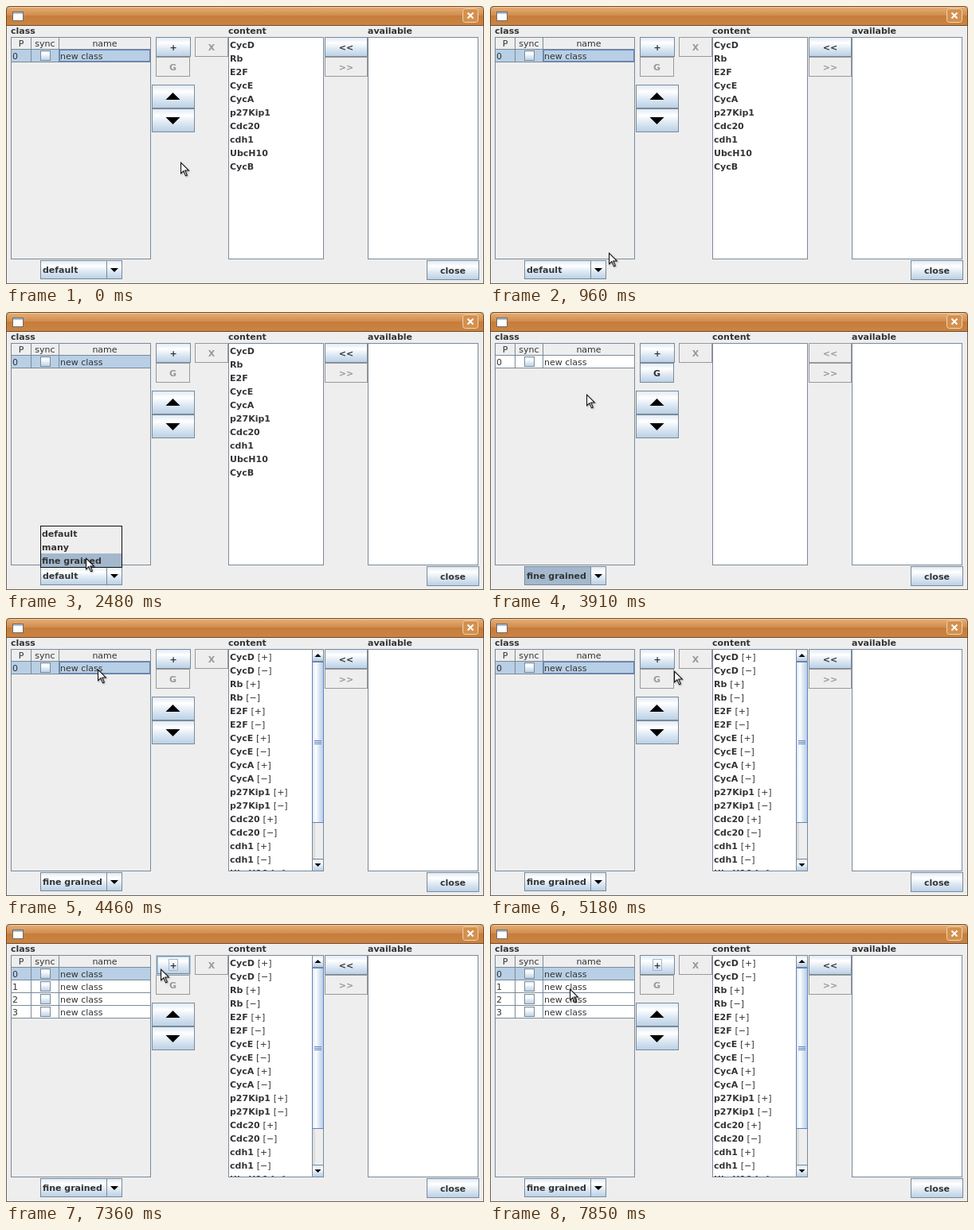
Recreate the animation shown at these times as an HTML page with a canvas. Size 600x350 px, loop 8 s.

```html
<!DOCTYPE html>
<html>
<head>
<meta charset="utf-8">
<style>
html, body { margin: 0; width: 100%; height: 100%; overflow: hidden; background: #eee; }
canvas { display: block; }
</style>
</head>
<body>
<canvas id="stage" width="600" height="350"></canvas>
<script>
const c = document.getElementById('stage').getContext('2d');
const LOOP = 8000;
const EDGE = '#7a8a99', SELECT = '#b8cfe5', FOCUS = '#a3b8cc', BLUE = '#6382bf', INK = '#333', OFF = '#999';
const SPECIES = ['CycD', 'Rb', 'E2F', 'CycE', 'CycA', 'p27Kip1', 'Cdc20', 'cdh1', 'UbcH10', 'CycB'];
const MODES = ['default', 'many', 'fine grained'];

// Pointer moves: start time, time per step, then [step, x, y] waypoints
const MOVES = [
  [0, 1, [[0, 219, 196]]],
  [640, 40, [[0, 219, 196], [2, 224, 206], [5, 190, 262], [9, 149, 310], [12, 141, 325], [16, 138, 330]]],
  [1980, 45.4, [[0, 138, 330], [2, 141, 326], [5, 124, 316], [12, 100, 309]]],
  [3670, 47.5, [[0, 100, 309], [1, 95, 311], [2, 100, 265], [4, 126, 145], [6, 121, 103], [9, 117, 73], [13, 115, 64]]],
  [4730, 47.6, [[0, 115, 64], [3, 165, 70], [7, 230, 74], [8, 237, 72], [10, 231, 66], [14, 213, 58]]],
  [5610, 1, [[0, 209, 53]]],
  [7360, 49, [[0, 209, 53], [3, 165, 62], [7, 115, 77], [11, 100, 81]]]
];

function pointer(t) {
  const [start, dt, pts] = MOVES.filter(m => m[0] <= t).pop();
  const step = Math.floor((t - start) / dt) + 1;
  const n = pts.findIndex(p => p[0] >= step);
  if (n < 1) return pts[pts.length - 1].slice(1);
  const [a, ax, ay] = pts[n - 1], [b, bx, by] = pts[n];
  const k = (step - a) / (b - a);
  return [Math.round(ax + (bx - ax) * k), Math.round(ay + (by - ay) * k)];
}

function fill(x, y, w, h, color) {
  c.fillStyle = color;
  c.fillRect(x, y, w, h);
}

function frame(x, y, w, h, color) {
  c.strokeStyle = color;
  c.lineWidth = 1;
  c.strokeRect(x + .5, y + .5, w - 1, h - 1);
}

function text(s, x, y, { color = INK, bold = true, align = 'left' } = {}) {
  c.font = (bold ? 'bold ' : '') + '11px "DejaVu Sans", sans-serif';
  c.textAlign = align;
  c.fillStyle = color;
  c.fillText(s, x, y);
}

function shape(points, color) {
  c.beginPath();
  points.forEach(p => c.lineTo(...p));
  c.closePath();
  c.fillStyle = color;
  c.fill();
}

// Triangle with its top edge (or apex) at y
function arrow(x, y, half, h, up) {
  const base = up ? y + h : y;
  shape([[x - half, base], [x + half, base], [x, up ? y : y + h]], '#000');
}

function gloss(x, y, w, h, sideways) {
  const g = sideways ? c.createLinearGradient(x, 0, x + w, 0) : c.createLinearGradient(0, y, 0, y + h);
  g.addColorStop(0, '#dde8f3');
  g.addColorStop(.3, '#fff');
  g.addColorStop(.6, '#dde8f3');
  g.addColorStop(1, SELECT);
  fill(x, y, w, h, g);
}

function button(x, y, w, h, label, { on = true, hover = false, focus = false } = {}) {
  if (on) gloss(x, y, w, h);
  frame(x, y, w, h, on ? EDGE : OFF);
  if (hover) {
    frame(x, y, w, h, SELECT);
    frame(x + 1, y + 1, w - 2, h - 2, EDGE);
    frame(x + 2, y + 2, w - 4, h - 4, SELECT);
  }
  const mid = x + w / 2;
  if (focus) frame(Math.round(mid) - 6, y + 5, 12, 15, FOCUS);
  text(label, mid, y + Math.round(h / 2) + 4, { color: on ? INK : OFF, align: 'center' });
}

function panel(x, w, color) {
  fill(x, 39, w, 280, color);
  frame(x, 39, w, 280, EDGE);
}

function titleBar() {
  fill(0, 0, 600, 25, '#ddd');
  const g = c.createLinearGradient(0, 0, 0, 24);
  [[0, '#e9b987'], [.15, '#e0a76d'], [.48, '#d18d4e'], [.52, '#c67d3c'], [1, '#cb8443']].forEach(s => g.addColorStop(...s));
  c.beginPath();
  c.roundRect(0, 0, 600, 25, [5, 5, 0, 0]);
  c.fillStyle = '#704a28';
  c.fill();
  c.beginPath();
  c.roundRect(1, 1, 598, 23, [4, 4, 0, 0]);
  c.fillStyle = g;
  c.fill();
  fill(5, 1, 590, 1, '#f0c89c');

  fill(8, 7, 14, 12, '#fff');
  frame(8, 7, 14, 12, '#6d6d6d');
  fill(9, 8, 12, 2, '#aebfd4');

  c.beginPath();
  c.roundRect(573.5, 3.5, 19, 17, 3);
  c.fillStyle = '#d3914f';
  c.fill();
  c.strokeStyle = '#f3d3ae';
  c.lineWidth = 1;
  c.stroke();
  c.beginPath();
  c.moveTo(579.5, 8.5); c.lineTo(586.5, 15.5);
  c.moveTo(586.5, 8.5); c.lineTo(579.5, 15.5);
  c.strokeStyle = '#fff';
  c.lineWidth = 2;
  c.stroke();
}

function classTable(rows, selected, cellFocus) {
  panel(6, 176, '#eee');
  const plain = { bold: false };
  [['P', 19], ['sync', 49], ['name', 124]].forEach(([s, x]) => text(s, x, 51, { bold: false, align: 'center' }));
  fill(7, 54, 174, 1, EDGE);
  for (let i = 0; i < rows; i++) {
    const y = 55 + i * 16;
    fill(7, y, 174, 15, i === 0 && selected ? SELECT : '#fff');
    fill(7, y + 15, 174, 1, EDGE);
    text(i, 8, y + 12, plain);
    text('new class', 68, y + 12, plain);
    gloss(43, y + 1, 13, 13);
    frame(43, y + 1, 13, 13, EDGE);
  }
  [31, 66].forEach(x => fill(x, 40, 1, 15 + rows * 16, EDGE));
  if (cellFocus) frame(67, 55, 114, 15, BLUE);
}

function contentList(fine) {
  c.save();
  c.beginPath();
  c.rect(280, 40, 118, 278);
  c.clip();
  SPECIES.forEach((name, i) => {
    if (!fine) return text(name, 281, 53 + i * 17);
    ['[+]', '[\u2212]'].forEach((sign, j) => {
      const y = 53 + (2 * i + j) * 17;
      text(name, 281, y);
      const w = c.measureText(name + ' ').width;
      text(sign, 281 + w, y, { bold: false });
    });
  });
  c.restore();
  if (fine) scrollBar();
}

function scrollBar() {
  fill(384, 40, 14, 278, '#eee');
  fill(385, 257, 3, 47, '#ddd');
  frame(384, 39, 15, 280, EDGE);
  [40, 304].forEach(y => {
    gloss(385, y, 13, 14);
    frame(384, y - 1, 15, 16, EDGE);
    arrow(391.5, y + 5, 4, 4, y === 40);
  });
  gloss(385, 55, 13, 202, true);
  frame(384, 55, 15, 203, BLUE);
  [154, 156, 158].forEach(y => fill(387, y, 9, 1, BLUE));
}

function combo(label, focus) {
  gloss(43, 320, 103, 24);
  if (focus) fill(44, 321, 82, 22, FOCUS);
  frame(43, 320, 103, 24, EDGE);
  fill(126, 320, 1, 24, EDGE);
  arrow(136, 330, 5, 5, false);
  text(label, 46, 336);
}

function popup(active) {
  fill(43, 269, 103, 53, '#eee');
  fill(44, 270 + active * 17, 101, 17, FOCUS);
  MODES.forEach((s, i) => text(s, 45, 283 + i * 17));
  frame(43, 269, 103, 53, '#111');
}

function cursor(x, y) {
  const outline = [[0, 0], [0, 16], [3.7, 12.6], [6.2, 18.5], [9, 17.3], [6.5, 11.6], [11.6, 11.4]];
  const inner = [[1.1, 2.6], [1.1, 13.5], [4.1, 10.8], [6.7, 17.1], [7.6, 16.7], [5, 10.6], [9.1, 10.4]];
  c.save();
  c.translate(x, y);
  c.shadowColor = 'rgba(0,0,0,.3)';
  c.shadowBlur = 2;
  c.shadowOffsetX = c.shadowOffsetY = 1;
  shape(outline, '#111');
  c.shadowColor = 'transparent';
  shape(inner, '#fff');
  c.restore();
}

function draw(t) {
  const [px, py] = pointer(t);
  const fine = t >= 3220;
  const idle = fine && t < 4460;
  const rows = 1 + [6080, 6680, 7360].filter(at => t >= at).length;
  const hover = px >= 188 && px < 232 && py >= 39 && py < 64;

  fill(0, 0, 600, 350, '#eee');
  titleBar();
  [0, 599].forEach(x => fill(x, 25, 1, 325, '#6e6257'));
  fill(0, 349, 600, 1, '#6e6257');

  [['class', 6], ['content', 279], ['available', 454]].forEach(([s, x]) => text(s, x, 35));
  classTable(rows, !idle, t < 1770 || (t >= 4460 && t < 6080));
  panel(279, 120, '#fff');
  panel(454, 139, '#fff');
  if (!idle) contentList(fine);

  button(188, 39, 44, 25, '+', { hover, focus: t >= 6080 });
  button(188, 64, 43, 25, 'G', { on: idle });
  button(237, 39, 42, 25, 'X', { on: false });
  button(400, 39, 54, 25, '<<', { on: !idle });
  button(400, 64, 54, 25, '>>', { on: false });
  button(183, 99, 54, 30, '');
  button(183, 129, 54, 30, '');
  arrow(209.5, 109, 9, 9, true);
  arrow(209.5, 140, 9, 9, false);
  button(528, 320, 66, 25, 'close');

  combo(MODES[fine ? 2 : 0], idle);
  if (t >= 1770 && !fine) popup(py < 321 ? Math.floor((py - 270) / 17) : t < 1980 ? 0 : 2);
  cursor(px, py);
}

function tick(now) {
  draw(now % LOOP);
  requestAnimationFrame(tick);
}
requestAnimationFrame(tick);
</script>
</body>
</html>
```
